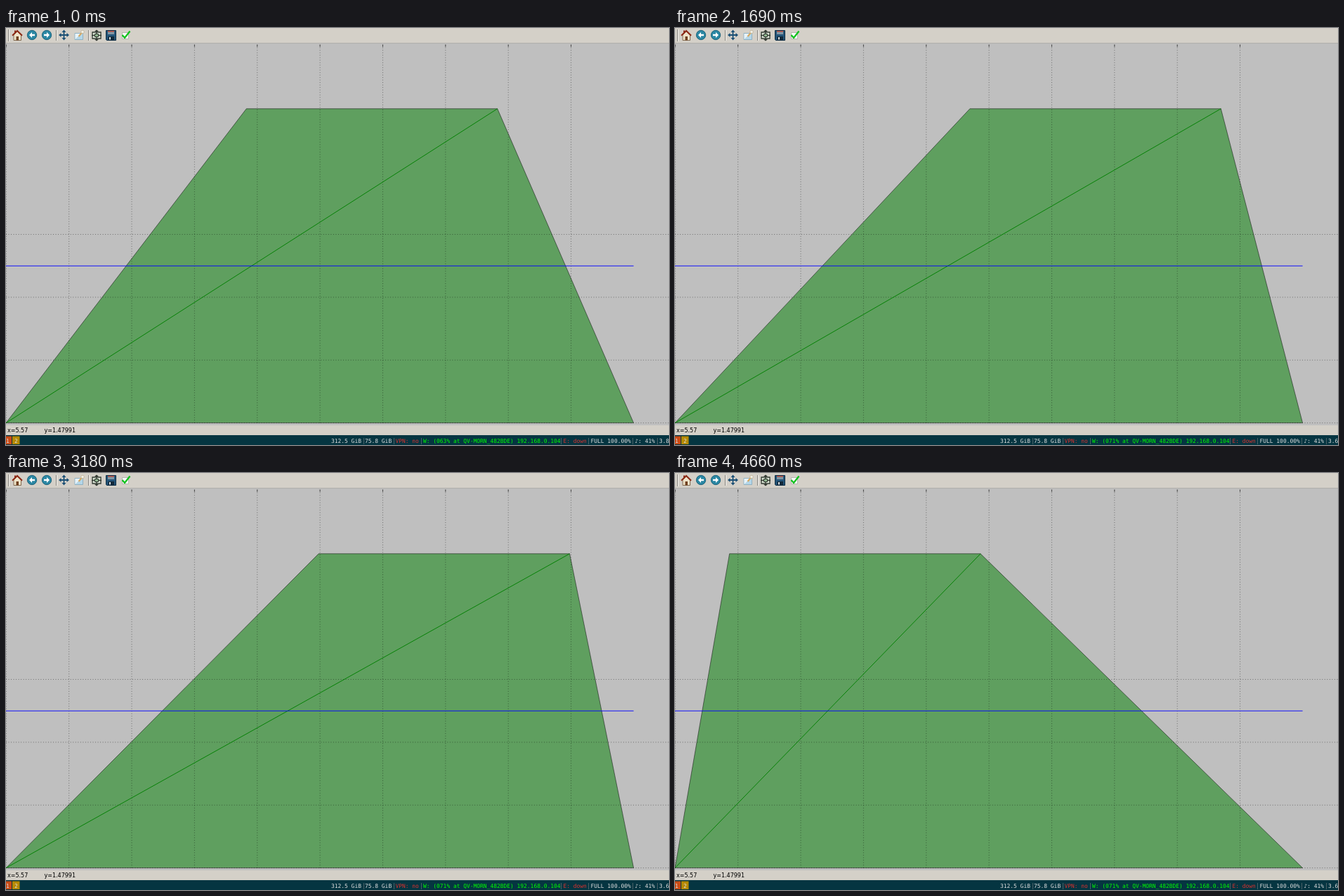
Write an HTML page that moves like this. It is 944 px wide and 593 px high and loops after 4900 ms.

```html
<!DOCTYPE html>
<html lang="en">
<head>
<meta charset="utf-8">
<title>Shearing trapezoid</title>
<style>
  html, body { margin: 0; width: 100%; height: 100%; overflow: hidden; background: #bfbfbf; }
  svg { display: block; }
  text { white-space: pre; }
  .readout { font: 8px "DejaVu Sans", sans-serif; }
  .bar { font: 7.93px "DejaVu Sans Mono", monospace; fill: #dfdfdf; }
  .bar .off { fill: #dc322f; }
  .bar .on { fill: #0f0; }
</style>
</head>
<body>
<svg width="944" height="593" viewBox="0 0 944 593">
  <path id="shape" fill="#008000" fill-opacity=".5" stroke="#000" stroke-opacity=".55" stroke-width=".9"/>
  <path id="grid" fill="none" stroke="#000" stroke-opacity=".6" stroke-width=".8" stroke-dasharray=".9 2.63"/>
  <path id="ticks" stroke="#000" stroke-opacity=".7" stroke-width=".8"/>
  <path id="diagonal" stroke="#008000" stroke-width=".95"/>
  <path id="middle" stroke="#00f" stroke-width=".9"/>

  <!-- toolbar -->
  <path d="M0 0H944V21.3H0Z" fill="#d4d0c8"/>
  <path d="M0 21.7H944" stroke="#aaa8a4" stroke-width=".8"/>
  <path d="M3.5 2V19M71.5 3V18M117.5 3V18" stroke="#85827c"/>
  <path d="M4.5 2V19M72.5 3V18M118.5 3V18" stroke="#f4f2ee"/>
  <g id="home">
    <path d="M11 10V17.5H21.5V10L16 5Z" fill="#eee3c9" stroke="#6b5135" stroke-width=".8"/>
    <path d="M12 3.5H14V7H12Z" fill="#8b2a1a"/>
    <path d="M9 10.8L16 4L23 10.8" fill="none" stroke="#8f2c18" stroke-width="2"/>
    <path d="M14.5 12H18V17.5H14.5Z" fill="#70401e"/>
  </g>
  <g id="arrows" stroke="#0f5670" stroke-width=".8" fill="#2b87a3">
    <circle cx="37" cy="10" r="6.7"/>
    <circle cx="58" cy="10" r="6.7"/>
    <path d="M33 10L37 6V8.7H41V11.3H37V14ZM62 10L58 6V8.7H54V11.3H58V14Z" fill="#fff" stroke="none"/>
  </g>
  <g id="pan">
    <path d="M77 10H88M82.5 4.5V15.5" stroke="#1c5075" stroke-width="1.8"/>
    <path d="M75 10L78.5 7V13ZM90 10L86.5 7V13ZM82.5 2.5L79.5 6H85.5ZM82.5 17.5L79.5 14H85.5Z" fill="#1c5075"/>
  </g>
  <g id="zoom">
    <path d="M98 7.5H109.5V16.5H98Z" fill="#b4d6e8" stroke="#83a9bd" stroke-width=".8"/>
    <path d="M98.5 16L107 8H98.5Z" fill="#e8f3f8"/>
    <path d="M103.5 12L109 5.5" stroke="#d9a75c" stroke-width="2"/>
    <circle cx="109" cy="5.5" r="2.3" fill="#f0eee4" stroke="#b9a98a" stroke-width=".7"/>
  </g>
  <g id="subplots">
    <path d="M123 6H135V15H123Z" fill="#dce5d6" stroke="#303830" stroke-width="1.3"/>
    <path d="M122 10.5H136M129 3.5V17.5" stroke="#303830" stroke-width="1.3"/>
    <path d="M126.5 8.5H131.5V12.5H126.5Z" fill="#8fb48f" stroke="#303830"/>
    <path d="M126 5L129 2.5L132 5ZM126 16L129 18.5L132 16Z" fill="#303830"/>
  </g>
  <g id="save">
    <path d="M142.5 3.5H156.5V17.5H143.5L142.5 16.5Z" fill="#245579" stroke="#102e45"/>
    <path d="M145 4H154V9H145Z" fill="#8296a3"/>
    <path d="M145 4H154V5.5H145Z" fill="#b44a3e"/>
    <path d="M145.5 12H154V17H145.5Z" fill="#12293a"/>
    <path d="M147 13H149V16.5H147Z" fill="#d5dce0"/>
  </g>
  <g id="check">
    <path d="M165.5 6.5H174.5V15.5H165.5Z" fill="#fafafa" stroke="#aaa9a4" stroke-width=".8"/>
    <path d="M165.5 10L169 14L176.5 4.5" fill="none" stroke="#10c31d" stroke-width="2.3"/>
  </g>

  <!-- cursor readout and desktop status bar -->
  <path d="M0 565H944V579H0Z" fill="#d4d0c8"/>
  <g class="readout">
    <text x="2" y="575">x=5.57</text>
    <text x="54.5" y="575">y=1.47991</text>
  </g>
  <path d="M0 579H944V593H0Z" fill="#053541"/>
  <path d="M0 580.5H8V592H0Z" fill="#cb4b16"/>
  <path d="M9 580.5H19.5V592H9Z" fill="#b58900"/>
  <path d="M509.5 583V592M552.5 583V592M591.5 583V592M790.5 583V592M829.5 583V592M892.5 583V592M927.5 583V592" stroke="#5c6c70" stroke-width=".8"/>
  <g class="bar">
    <text x="0" y="590">1</text>
    <text x="12" y="590">2</text>
    <text x="463" y="590">312.5 GiB</text>
    <text x="511" y="590">75.8 GiB</text>
    <text x="554.5" y="590" class="off">VPN: no</text>
    <text x="594" y="590" class="on" id="wifi"></text>
    <text x="793.5" y="590" class="off">E: down</text>
    <text x="832.5" y="590">FULL 100.00%</text>
    <text x="895.5" y="590">♪: 41%</text>
    <text x="930" y="590" id="load"></text>
  </g>
</svg>
<script>
const LOOP = 4900, UNIT = 89.36, BASE = 561.6, TOP = BASE - 5 * UNIT;
const STEPS = [210, 710, 1210, 1690, 2190, 2690, 3180, 3670, 4170, 4660];
const STATUS_CHANGE = 1600;
const $ = id => document.getElementById(id);
const setPath = (id, d) => $(id).setAttribute('d', d);

let grid = '', ticks = '';
for (let i = 0; i < 10; i++) {
  const x = i * UNIT + .3;
  grid += `M${x} ${BASE}V23`;
  ticks += `M${x} 23.5v3.5`;
}
for (let i = 0; i < 4; i++) grid += `M0 ${BASE - i * UNIT}H944`;
setPath('grid', grid);
setPath('ticks', ticks);
setPath('middle', `M0 ${BASE - 2.5 * UNIT + .1}H${10 * UNIT}`);

function draw(t) {
  // The top edge advances along a sine, 5 degrees per step, restarting after 85.
  const step = STEPS.filter(start => start <= t).length;
  const degrees = (10 + step) % 18 * 5;
  const left = 5 * UNIT * Math.sin(degrees * Math.PI / 180);
  const right = left + 4 * UNIT;
  setPath('shape', `M0 ${BASE}L${left} ${TOP}H${right}L${10 * UNIT} ${BASE}Z`);
  setPath('diagonal', `M0 ${BASE}L${right} ${TOP}`);

  const late = t >= STATUS_CHANGE;
  $('wifi').textContent = `W: (${late ? '071' : '063'}% at QV-MORN_482BDE) 192.168.0.104`;
  $('load').textContent = late ? '3.6' : '3.8';
}

function tick() {
  draw(performance.now() % LOOP);
  requestAnimationFrame(tick);
}
tick();
</script>
</body>
</html>
```
